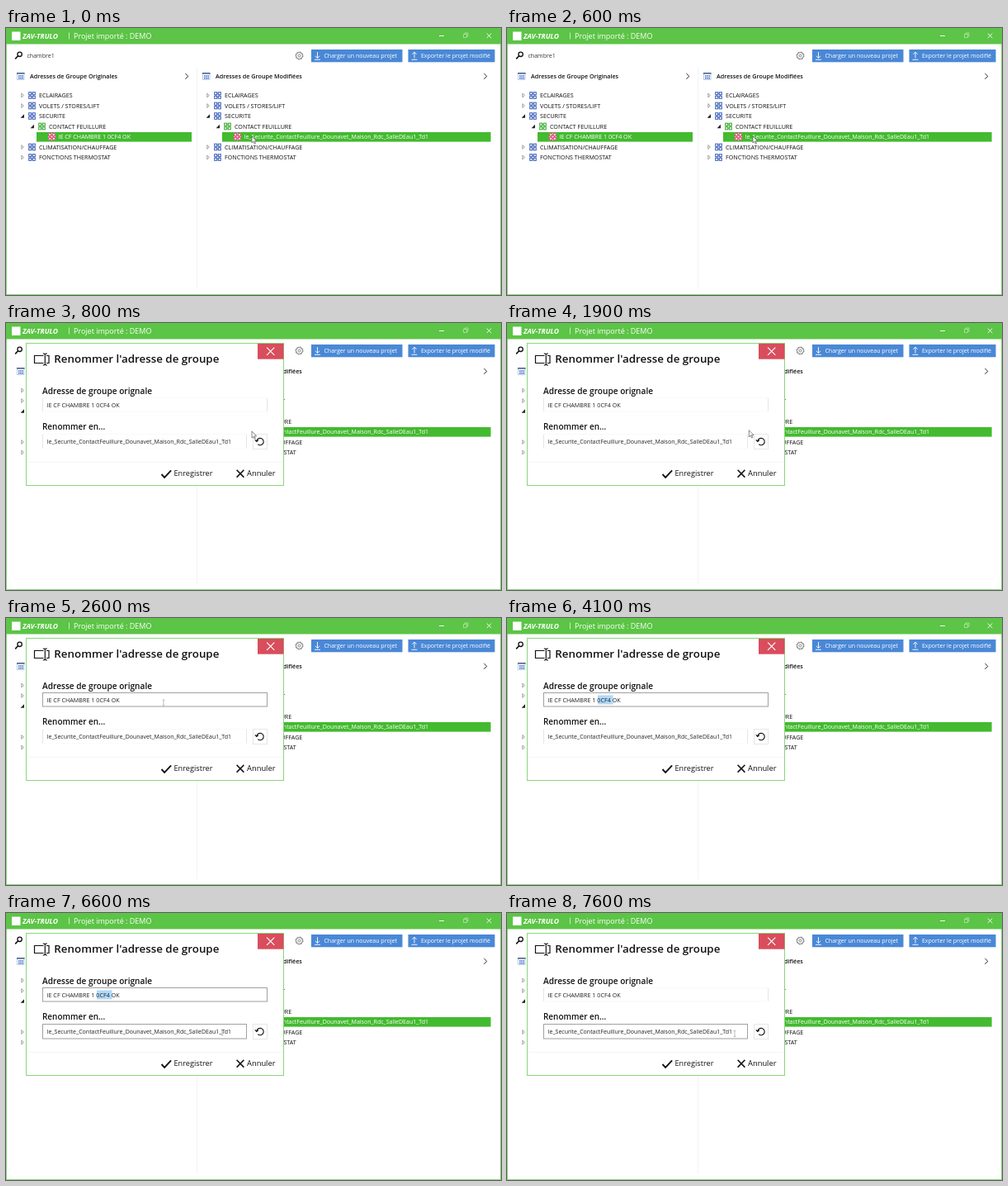
These frames come from a looping animation (600 px wide and 323 px high, 8000 ms). An HTML page:

```html
<!DOCTYPE html>
<html lang="fr">
<head>
<meta charset="utf-8">
<style>
html, body { margin: 0; width: 100%; height: 100%; overflow: hidden; background: #fff; }
svg { display: block; width: 600px; height: 323px; font-family: "Open Sans", "Noto Sans", sans-serif; }
text { white-space: pre; }
</style>
</head>
<body>
<svg id="stage" viewBox="0 0 600 323"></svg>
<script>
const GREEN = '#43ba2f', BAR = '#5cc446', EDGE = '#8ad67c', BLUE = '#4a88d6', INK = '#111';
const LONG = 'Ie_Securite_ContactFeuillure_Dounavet_Maison_Rdc_SalleDEau1_Td1';
const SHORT = 'IE CF CHAMBRE 1 0CF4 OK';
const LOOP = 8000;

const text = (x, y, size, s, fill = INK, extra = '') =>
  `<text x="${x}" y="${y}" font-size="${size}" fill="${fill}" ${extra}>${s}</text>`;
const bold = (x, y, size, s) => text(x, y, size, s, INK, 'font-weight="600"');
const light = (x, y, size, s) => text(x, y, size, s, '#fff', 'font-weight="500"');
const rect = (x, y, w, h, fill, extra = '') =>
  `<rect x="${x}" y="${y}" width="${w}" height="${h}" fill="${fill}" ${extra}/>`;
const line = (d, stroke = INK, width = 1, extra = '') =>
  `<path d="${d}" fill="none" stroke="${stroke}" stroke-width="${width}" ${extra}/>`;
const cross = (x, y, r, stroke, width) =>
  line(`M${x - r} ${y - r}l${2 * r} ${2 * r}m0 ${-2 * r}l${-2 * r} ${2 * r}`, stroke, width);

function groupIcon(x, y, color) {
  let out = rect(x - 4.5, y - 4.5, 9, 9, '#fff');
  for (const dx of [-3.8, 0.8])
    for (const dy of [-3.8, 0.8])
      out += rect(x + dx, y + dy, 3, 3, '#fff', `stroke="${color}" stroke-width="1.1"`);
  return out + line(`M${x - 1} ${y - 2.2}h2m-2 4.4h2M${x - 2.2} ${y - 1}v2m4.4 -2v2`, color, 0.8);
}

const arrow = (x, y, open) => open
  ? `<path d="M${x + 2} ${y - 2.2}v4.4h-4.4z" fill="#222"/>`
  : line(`M${x - 1.2} ${y - 2.4}l2.6 2.4l-2.6 2.4z`, '#888', 0.8);

function row(dx, i, level, label, open) {
  const x = dx + level * 12, y = 81.5 + i * 12.5;
  const color = ['#4668bd', '#3fae35', '#d8436e'][level];
  const name = level === 2
    ? light(x + 39.5, y + 2.6, dx ? 7.02 : 7.15, label)
    : arrow(x + 20, y, open) + text(x + 40, y + 2.6, 7.15, label);
  return groupIcon(x + 31.5, y, color) + name;
}

function panel(dx, title, leaf, barWidth, chevron) {
  const rows = [
    [0, 'ECLAIRAGES'], [0, 'VOLETS / STORES/LIFT'], [0, 'SECURITE', true],
    [1, 'CONTACT FEUILLURE', true], [2, leaf],
    [0, 'CLIMATISATION/CHAUFFAGE'], [0, 'FONCTIONS THERMOSTAT']
  ];
  const grid = rect(dx + 13.5, 54.5, 8.5, 8, '#fff', 'stroke="#a9c0e4" stroke-width=".8"') +
    rect(dx + 13, 54, 9.5, 1.6, '#4a5f8c') +
    line(`M${dx + 15} 58h6M${dx + 15} 60.6h6`, '#2f62c4', 1.6, 'stroke-dasharray="1.5 .7"');
  return grid + bold(dx + 29, 61, 7.2, title) +
    line(`M${chevron - 1.6} 55l3.4 3.4l-3.4 3.4`, '#222') +
    rect(dx + 37, 126, barWidth, 11.6, GREEN) +
    rows.map(([level, label, open], i) => row(dx, i, level, label, open)).join('');
}

function blueButton(x, w, label, up) {
  const head = up ? 'm-2.6 -4.6l2.6 -2.6l2.6 2.6' : 'm-2.6 -2.6l2.6 2.6l2.6 -2.6';
  return rect(x, 26, w, 15.3, BLUE) +
    line(`M${x + 7.5} 29.2v7.2${head}M${x + 4} 38.3h7`, '#fff', 0.9) +
    light(x + 15.4, 36.2, 7.05, label);
}

const main =
  rect(0.5, 0.5, 599, 322, '#fff', `stroke="${EDGE}"`) +
  rect(0, 0, 600, 19.5, BAR) +
  rect(7, 4.5, 10.5, 10.5, '#fff') +
  text(20, 13, 8.5, 'ZAV-TRULO', '#fff', 'font-weight="700" font-style="italic"') +
  line('M76.5 5.5v8', '#d4f0cd', 0.9) +
  light(82, 13, 9, 'Projet importé : DEMO') +
  line('M525 9.5h6', '#fff', 0.9) +
  line('M554.5 7.5h4v4h-4zM556 7.5v-1.5h4v4h-1.5', '#b5e5aa', 0.8) +
  cross(585.5, 9.3, 2.8, '#fff', 0.9) +
  `<circle cx="16.6" cy="31.8" r="2.7" fill="none" stroke="${INK}" stroke-width="1.3"/>` +
  line('M14.6 33.8l-3.4 3.6', INK, 1.6) +
  text(25.5, 36.2, 7.05, 'chambre1', '#333') +
  '<circle cx="355.5" cy="33.5" r="4" fill="none" stroke="#777" stroke-width="1"/>' +
  '<circle cx="355.5" cy="33.5" r="4.6" fill="none" stroke="#777" stroke-width=".8" stroke-dasharray="1.8 1.8"/>' +
  '<circle cx="355.5" cy="33.5" r="1.5" fill="none" stroke="#777" stroke-width=".9"/>' +
  blueButton(370, 110.5, 'Charger un nouveau projet') +
  blueButton(487.5, 105, 'Exporter le projet modifié', true) +
  line('M231.5 48v268', '#f3f3f3') +
  panel(0, 'Adresses de Groupe Originales', SHORT, 188, 219) +
  panel(225, 'Adresses de Groupe Modifiées', LONG, 325.6, 581);

const field = (id, x, y, w, h) =>
  line(`M${x} ${y}v${h}m${w} 0v${-h}`, '#e6e6e6') +
  line(`M${x} ${y}h${w}m0 ${h}h${-w}`, '#f9f9f9') +
  rect(x, y, w, h, 'none', `id="${id}" stroke="#a0a0a0"`);

const dialog =
  rect(24.5, 24.5, 312, 172, '#fff', `stroke="${EDGE}"`) +
  rect(305, 25, 31.5, 18.7, '#d94d5c') + cross(320.7, 34.2, 4.6, '#fff', 1.2) +
  line('M25 168.3h311', '#f4f4f4') +
  line('M45.5 39.5h-11v9h11M49 39.5h3v9h-3M47.3 38v12M44.8 37h1.2l1.3 1l1.3 -1h1.2M44.8 51h1.2l1.3 -1l1.3 1h1.2', INK, 1.2) +
  bold(58.3, 48.4, 13.35, "Renommer l'adresse de groupe") +
  bold(44, 85.6, 10.12, 'Adresse de groupe orignale') +
  bold(44, 129, 9.95, 'Renommer en...') +
  field('box1', 44.5, 90.5, 272, 16.5) +
  rect(110, 93.5, 18.5, 11, '#b0d9fa', 'id="sel"') +
  text(49.5, 101.8, 7.2, SHORT, '#222') +
  field('box2', 44.5, 134.5, 247, 17.5) +
  text(49.5, 145.6, 7.02, LONG, '#222') +
  line('M273.5 138v9', '#222', 0.9, 'id="caret"') +
  rect(299.5, 134.5, 17, 18, '#fff', 'stroke="#e6e6e6"') +
  line('M303.8 143.2a4.2 4.2 0 1 1 1.4 3.5M301.8 141.4l2 2.1l2.1 -1.9', INK, 1.1) +
  line('M188.5 183l3.6 3.8l8 -8.4', INK, 1.9) +
  text(203.5, 185.4, 9.2, 'Enregistrer') +
  cross(284, 182.2, 4.4, INK, 1.6) +
  text(292, 185.4, 9.35, 'Annuler');

const pointer =
  '<path id="hand" d="M0 0v8l1.9 -1.7l1.4 3l1.2 -.6l-1.4 -2.9h2.6z" fill="#fff" stroke="#555" stroke-width=".7"/>' +
  line('M-1.3 -3h2.6M0 -3v7M-1.3 4h2.6', '#aaa', 0.8, 'id="beam"');

document.getElementById('stage').innerHTML =
  main + `<g id="dialog">${dialog}</g><g id="pointer">${pointer}</g>`;

const el = id => document.getElementById(id);
const show = (id, on) => el(id).setAttribute('visibility', on ? 'inherit' : 'hidden');

// pointer stops: time, x, y
const path = [
  [0, 298, 131], [1800, 298, 131], [2600, 191, 102], [2700, 191, 102],
  [3100, 112.5, 102], [3300, 112.5, 102], [3400, 112, 103],
  [5800, 111, 97], [6600, 262, 144], [6700, 262, 144], [7200, 276, 145.5], [LOOP, 276, 145.5]
];

function pointerAt(t) {
  const i = path.findIndex(p => p[0] > t);
  const [t0, x0, y0] = path[i - 1], [t1, x1, y1] = path[i];
  const u = (t - t0) / (t1 - t0), k = u * u * (3 - 2 * u);
  return [x0 + (x1 - x0) * k, y0 + (y1 - y0) * k];
}

function draw(t) {
  const [x, y] = pointerAt(t);
  const open = t >= 700;
  const inside = (l, top, r, b) => open && x >= l && x <= r && y >= top && y <= b;
  const over1 = inside(44, 90, 317, 107), over2 = inside(44, 134, 292, 152);
  const selected = t >= 3900 && t < 7100;
  const typing = (over1 || over2) && !(selected && inside(110, 93, 129, 105));
  show('dialog', open);
  show('box1', over1 || selected);
  show('box2', over2 || t >= 7100);
  show('sel', selected);
  show('caret', t >= 7100 && t < 7600);
  show('pointer', t < 3900 || t >= 5800);
  show('hand', !typing);
  show('beam', typing);
  el('pointer').setAttribute('transform', `translate(${x} ${y})`);
}

const start = performance.now();
function frame() {
  draw((performance.now() - start) % LOOP);
  requestAnimationFrame(frame);
}
frame();
</script>
</body>
</html>
```
